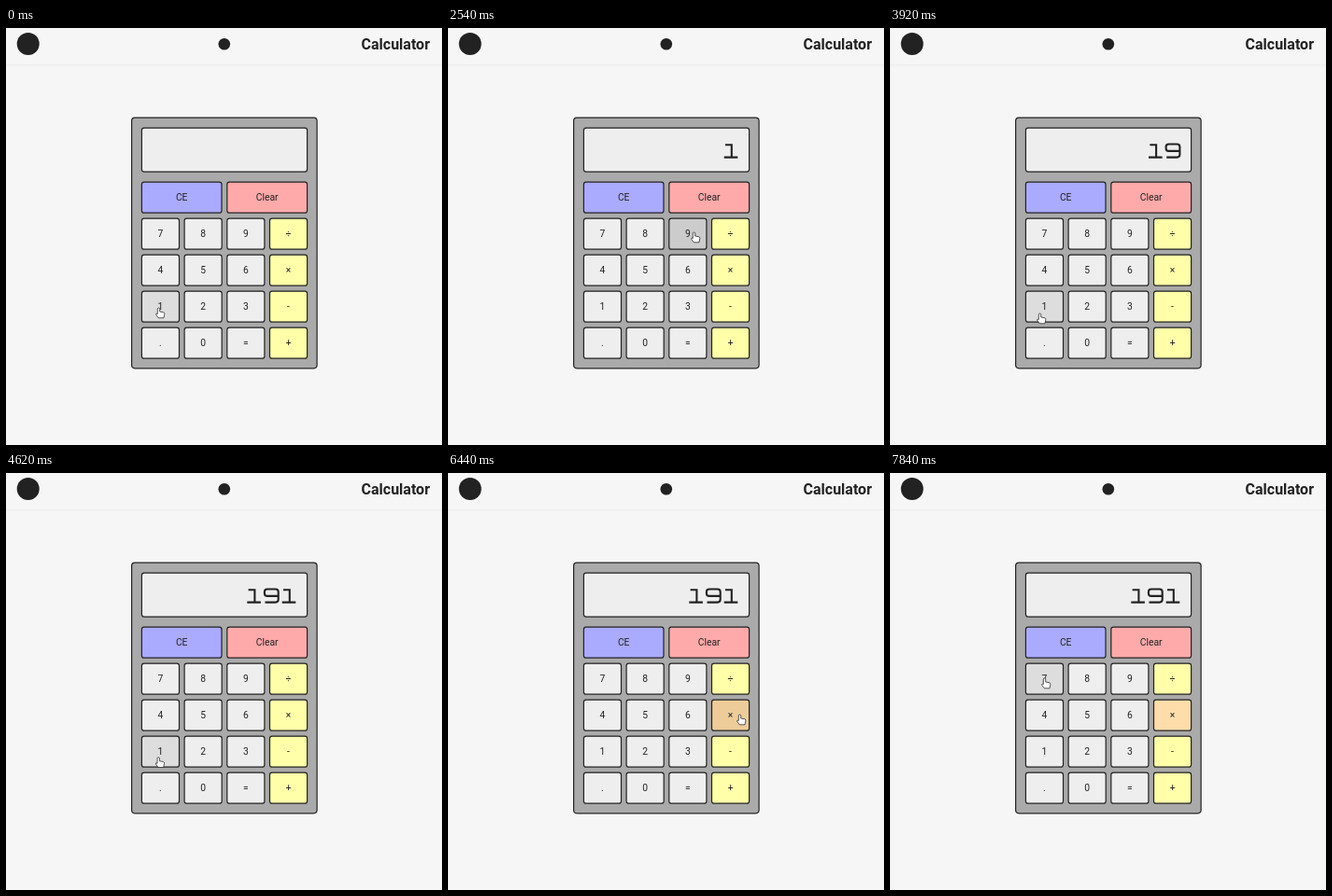
These frames come from a looping animation (467 px wide and 447 px high, 8 s). An HTML page:

```html
<!DOCTYPE html>
<html lang="en">
<head>
<meta charset="utf-8">
<title>Calculator</title>
<style>
  html, body { margin: 0; width: 100%; height: 100%; overflow: hidden; background: #f6f6f6; }
  svg { display: block; }
  text { font: 10.3px Roboto, sans-serif; fill: #222; text-anchor: middle; }
  .title { font-size: 16px; font-weight: 700; text-anchor: end; }
  .box { stroke: #222; stroke-width: 1.2; }
  .digits { fill: none; stroke: #222; stroke-width: 2.1; }
  .cursor { fill: #fff; stroke: #222; stroke-width: .75; stroke-linejoin: round; }
</style>
</head>
<body>
<svg id="stage" width="467" height="447" viewBox="0 0 467 447">
  <rect y="39" width="467" height="1" fill="#eee"/>
  <rect y="40" width="467" height="1" fill="#f2f2f2"/>
  <circle cx="23.7" cy="17" r="12" fill="#222"/>
  <circle cx="233.8" cy="17.2" r="6.3" fill="#222"/>
  <text class="title" x="454" y="23">Calculator</text>
</svg>
<script>
const LOOP = 8000;
const stage = document.getElementById('stage');

function add(tag, attrs, text = '') {
  const el = document.createElementNS('http://www.w3.org/2000/svg', tag);
  for (const name in attrs) el.setAttribute(name, attrs[name]);
  el.textContent = text;
  return stage.appendChild(el);
}

function box(x, y, width, height, fill, rx = 2.5) {
  return add('rect', { class: 'box', x, y, width, height, rx, fill });
}

// Normal, hovered and pressed fills
const GREY = ['#eee', '#ddd', '#ccc'];
const YELLOW = ['#ffa', '#ee9', '#dd8'];
const ORANGE = ['#fda', '#ec9', '#db8'];
const BLUE = ['#aaf', '#99e', '#88d'];
const RED = ['#faa', '#e99', '#d88'];

const keys = [];
function addKey(label, x, y, width, fills) {
  const rect = box(x, y, width, 33, fills[0]);
  add('text', { x: x + width / 2, y: y + 20.2 }, label);
  keys.push({ label, x, y, width, fills, rect });
}

box(134.6, 96.1, 198.5, 268.7, '#aaa', 3.5);
box(145.4, 107.2, 177.2, 46.9, '#eee');
addKey('CE', 145.4, 165.2, 85.6, BLUE);
addKey('Clear', 236.8, 165.2, 85.8, RED);
['789÷', '456×', '123-', '.0=+'].forEach((row, r) =>
  [...row].forEach((label, c) =>
    addKey(label, 145.4 + 45.7 * c, 204.2 + 39 * r, 40.1, c === 3 ? YELLOW : GREY)));

// Wide display digits, drawn around the centre of an 18.7 px cell
const GLYPHS = {
  1: 'M-6 125.2H.8V138.6M-7.3 138.6H7.3',
  9: 'M7.4 131.9H-4.4Q-7.4 131.9-7.4 129V127.3Q-7.4 124.5-4.4 124.5H4.4Q7.4 124.5 7.4 127.5V135.6Q7.4 138.6 4.4 138.6H-6.8',
};
const digits = [0, 1, 2].map(() => add('path', { class: 'digits' }));

function showValue(value) {
  digits.forEach((path, i) => {
    path.setAttribute('d', GLYPHS[value[i]] || '');
    path.setAttribute('transform', `translate(${303 - 18.7 * (value.length - 1 - i)})`);
  });
}

const HAND = 'M-1.2 6.4V.9Q-1 0 0 0T1.2 .9V4L5.4 4.8Q6.4 5 6.3 6.5L5.5 10.8H-.2L-2.9 7.2Q-3 5.4-1.2 6.4Z';
const ARROW = 'M0 0V10L2.4 7.9 4 11.2 5.5 10.5 4 7.4H7Z';
const cursor = add('path', { class: 'cursor' });

const linear = p => p;
const easeOut = p => 1 - (1 - p) ** 2;
const smooth = p => p * p * (3 - 2 * p);
const hold = () => 0;

// Cursor tip: time, x, y, easing towards the next stop
const stops = [
  [0, 163.5, 300, hold],
  [1650, 213.5, 254, hold],
  [1690, 214.5, 253, easeOut],
  [2260, 263.5, 219, hold],
  [2980, 263.5, 219, smooth],
  [3920, 160.5, 306, hold],
  [4560, 160.5, 306, smooth],
  [5150, 252.5, 264, hold],
  [5290, 270, 260, hold],
  [5330, 281.2, 258, hold],
  [5570, 286, 258, easeOut],
  [5900, 312.5, 259, hold],
  [6680, 312.5, 259, smooth],
  [7720, 171.5, 220, hold],
  [7830, 165.5, 220, hold],
  [LOOP, 165.5, 220, linear],
];

// Each press lasts from down to up; the value appears on release
const presses = [[840, 1100], [2540, 2920], [4180, 4480], [6180, 6440]];

function tipAt(t) {
  const i = stops.findIndex(stop => stop[0] > t) - 1;
  const [t0, x0, y0, ease] = stops[i];
  const [t1, x1, y1] = stops[i + 1];
  const p = ease((t - t0) / (t1 - t0));
  return [x0 + (x1 - x0) * p, y0 + (y1 - y0) * p];
}

function draw(t) {
  const [x, y] = tipAt(t);
  const pressed = presses.some(([down, up]) => t >= down && t < up);
  const clicks = presses.filter(([, up]) => t >= up).length;
  let overKey = false;
  for (const key of keys) {
    const hovered = x >= key.x && x < key.x + key.width && y >= key.y && y < key.y + 33;
    const fills = key.label === '×' && clicks === 4 ? ORANGE : key.fills;
    key.rect.setAttribute('fill', fills[hovered ? (pressed ? 2 : 1) : 0]);
    overKey ||= hovered;
  }
  showValue('191'.slice(0, clicks));
  cursor.setAttribute('d', overKey ? HAND : ARROW);
  cursor.setAttribute('transform', `translate(${x} ${y})`);
}

function frame() {
  draw(performance.now() % LOOP);
  requestAnimationFrame(frame);
}
frame();
</script>
</body>
</html>
```
